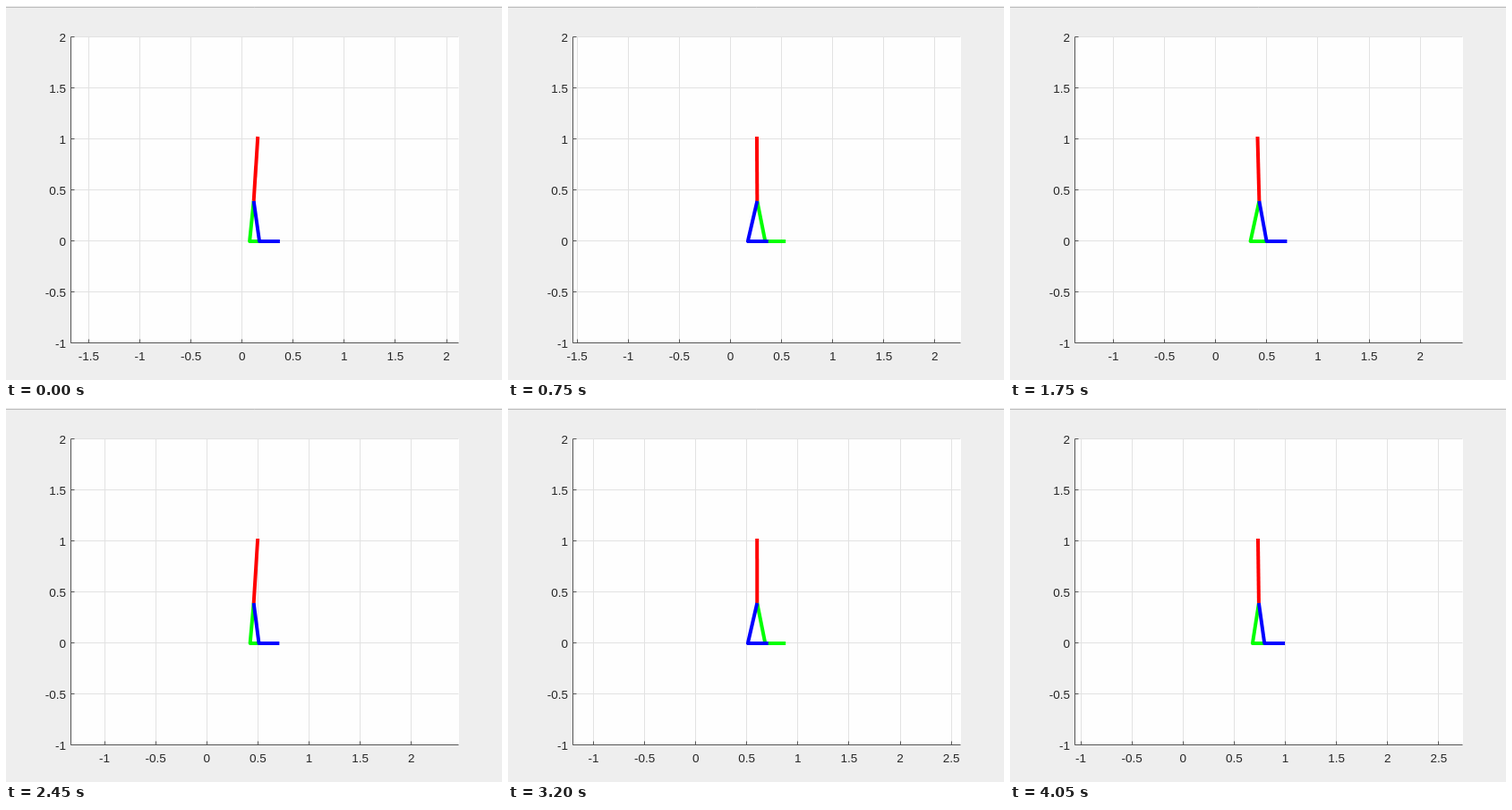
Recreate the animation shown at these times as an HTML page with a canvas. Size 554 by 418 pixels, loop 4100 ms.

```html
<!DOCTYPE html>
<html>
<head>
<meta charset="utf-8">
<title>Walking biped plot</title>
<style>
  html, body { margin: 0; width: 100%; height: 100%; overflow: hidden; background: #eee; }
  canvas { display: block; }
</style>
</head>
<body>
<canvas id="stage" width="554" height="418"></canvas>
<script>
const ctx = document.getElementById('stage').getContext('2d');
const LOOP = 4100, TICK = 50;
const LEFT = 72, RIGHT = 506, TOP = 34, BOTTOM = 376, MID = 289;
const UNIT = 114.2, FOOT = 0.2, STEP = 0.17;
const STEP_MS = 1215, SWING_MS = 940, LEAD_MS = 291;

const ease = u => (1 - Math.cos(Math.PI * Math.min(1, u))) / 2;
const yPx = y => 263 - y * 114;

function line(points, color, width) {
  ctx.beginPath();
  for (const [x, y] of points) ctx.lineTo(x, y);
  ctx.strokeStyle = color;
  ctx.lineWidth = width;
  ctx.stroke();
}

// Crisp one-pixel line on whole pixels
function hair(x1, y1, x2, y2, color) {
  const snap = v => Math.round(v) + 0.5;
  line([[snap(x1), snap(y1)], [snap(x2), snap(y2)]], color, 1);
}

function label(text, x, y, align) {
  ctx.textAlign = align;
  ctx.fillText(text, x, y);
}

function drawAxes(center) {
  const xPx = x => MID + (x - center) * UNIT;
  const ticks = [];
  for (let x = -2; x <= 3; x += 0.5) {
    if (Math.abs(x - center) <= 1.9) ticks.push(x);
  }
  ctx.fillStyle = '#eee';
  ctx.fillRect(0, 0, 554, 418);
  hair(-1, 1, 555, 1, '#bcbcbc');
  ctx.fillStyle = '#fefefe';
  ctx.fillRect(LEFT, TOP, RIGHT - LEFT, BOTTOM - TOP);

  const grid = '#e2e2e2', ink = '#262626';
  for (const x of ticks) hair(xPx(x) - 0.5, TOP, xPx(x) - 0.5, BOTTOM, grid);
  for (let y = -1; y <= 2; y += 0.5) hair(LEFT, yPx(y) - 1, RIGHT - 1, yPx(y) - 1, grid);

  hair(LEFT, TOP, LEFT, BOTTOM, '#555');
  hair(LEFT, BOTTOM, RIGHT - 1, BOTTOM, '#555');
  ctx.fillStyle = ink;
  ctx.font = '13.5px "Liberation Sans", Arial, sans-serif';
  for (const x of ticks) {
    hair(xPx(x) - 0.5, BOTTOM - 4, xPx(x) - 0.5, BOTTOM, '#555');
    label(x, xPx(x), 396, 'center');
  }
  for (let y = -1; y <= 2; y += 0.5) {
    hair(LEFT, yPx(y) - 1, LEFT + 4, yPx(y) - 1, '#555');
    label(y, 67, yPx(y) + 4.5, 'right');
  }
}

function draw(t) {
  const step = Math.floor((t + LEAD_MS) / STEP_MS);
  const swing = ease(((t + LEAD_MS) % STEP_MS) / SWING_MS);
  const moving = (step + 2 * swing) * STEP;
  const planted = (step + 1) * STEP;
  const [green, blue] = step % 2 ? [planted, moving] : [moving, planted];

  // The view is centred on the middle of both feet
  const mid = (green + blue) / 2;
  const center = mid + FOOT / 2;
  const xPx = x => MID + (x - center) * UNIT;
  drawAxes(center);

  const wave = shift => Math.cos(2 * Math.PI * (t + shift) / STEP_MS);
  const hip = [xPx(mid) - 0.9 * wave(-25), 218];
  const head = [xPx(mid) + 1.4 + 2.5 * wave(80), 146];
  const leg = heel => [hip, [xPx(heel), 263], [xPx(heel + FOOT), 263]];

  ctx.lineJoin = 'round';
  line([head, hip], '#f00', 4);
  line(leg(green), '#0f0', 4);
  line(leg(blue), '#00f', 4);
}

const start = performance.now();
function frame() {
  const t = (performance.now() - start) % LOOP;
  draw(Math.floor(t / TICK) * TICK);
  requestAnimationFrame(frame);
}
frame();
</script>
</body>
</html>
```
